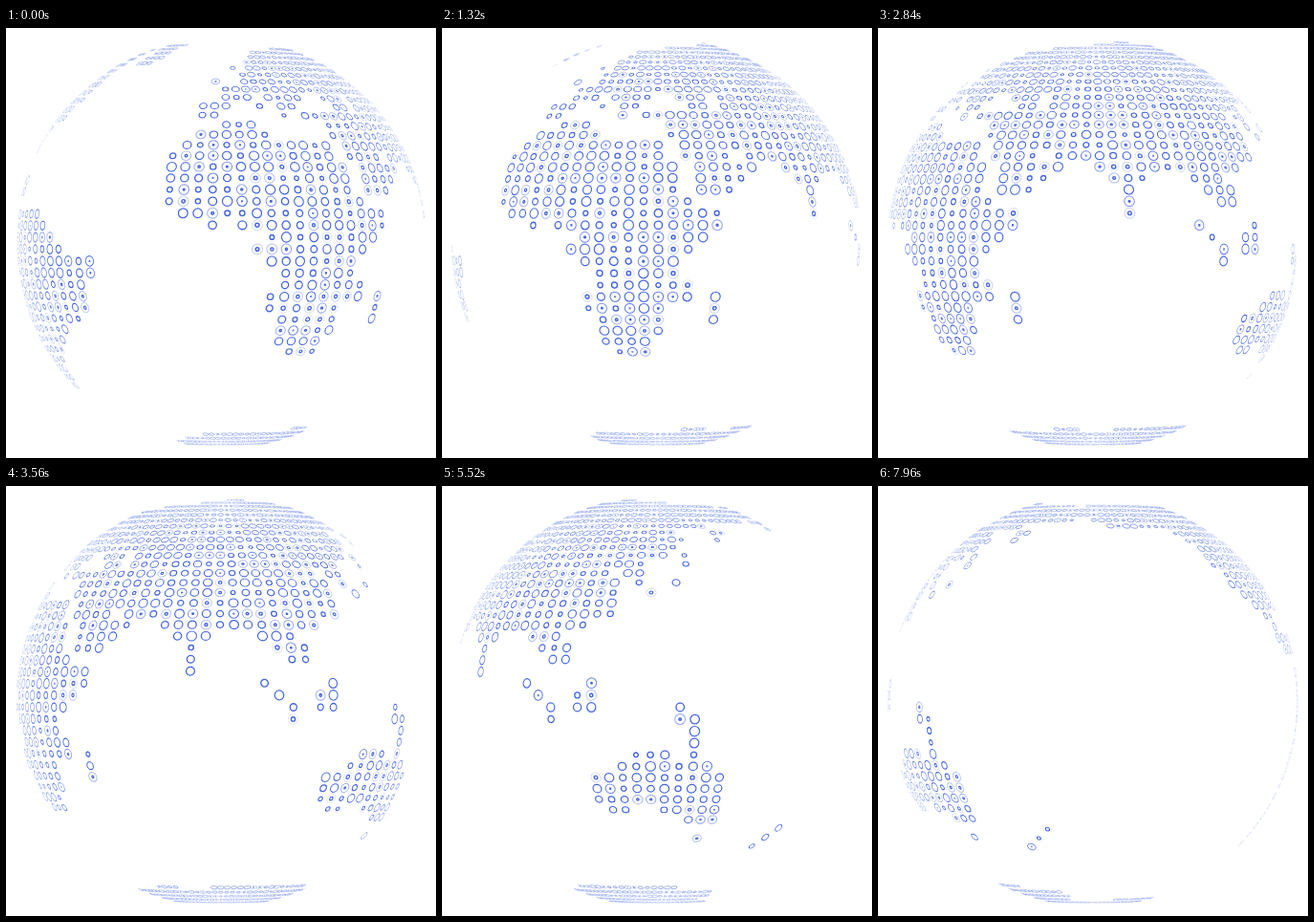
An HTML page with a canvas that plays this animation: 450 by 450 pixels, repeating every 8 s.

```html
<!DOCTYPE html>
<html lang="en">
<head>
<meta charset="utf-8">
<title>Dotted globe</title>
<style>
  html, body { margin: 0; width: 100%; height: 100%; overflow: hidden; background: #fff; }
  canvas { display: block; }
</style>
</head>
<body>
<canvas id="globe" width="450" height="450"></canvas>
<script>
const ctx = document.getElementById('globe').getContext('2d');

const LOOP = 8000;            // ms
const START_LON = -1.7;       // degrees facing the viewer at time 0
const SPIN = 25.28;           // degrees per second
const CENTER = 225.2;
const RADIUS = 215;
const CAMERA = 22;            // camera distance in globe radii
const MIN_DEPTH = 0.1;        // dots closer to the limb are hidden
const COL_STEP = 4;           // degrees of longitude per column
const ROW_STEP = 180 / 56;    // degrees of latitude per row
const RIPPLE = 1600;          // ms between two rings of one dot
const RING_LIFE = 1.3;        // life of a ring, in ripple periods
const RING_SIZE = 5.3;
const RAD = Math.PI / 180;

// Coastlines in grid units: x = column east of Greenwich, y = row from the north pole.
const coasts = {
  africa: `M-.5 16.5H2.5L3.5 18.4H8.4V20.4L9.4 20.6V23.5H10.4V24.5H12.4V26.4L10.4 28.4
    L9.4 28.6V30.5H10.4V32.5H8.4V35.5H7.4V37.4H4.6V36.5H3.6V33.5H2.6V31.5H3.6V29.6L1.6 28.3
    L2.6 26.5H.6V25.6H-.4V26.4H-1.4V25.4H-3.4L-4.4 24.4V19.6L-2.6 17.6L-.5 17.4Z`,
  eurasia: `M-.5 12.5H1.6V10.5H2.6V8.6L4.6 6.6H9.6V5.5H17.6V4.5H23.6V3.6H28.4V4.5H36.4V5.5
    H45.4L47.4 6.6V9.4H40.4V10.5H36.4V11.5H37.4V12.5H36.4V13.5H35.4V14.5H33.4V16.4H31.6V15.6
    H30.4V16.5H31.4V20.5H29.4V21.4H27.4L28.4 22.6V24.4H26.6V23.5H25.6V22.5H24.6V21.5H21.4V22.5
    H20.4V25.4H19.6V22.5H18.6V21.5H17.6V20.5H14.6V19.6H13.4V20.5H15.4V21.4L13.4 23.4H10.6V20.5
    H9.6V18.5H8.6V16.5H6.6V15.6H10.6V14.5H9.6V13.6H7.4V14.5H6.4V15.5H5.4V16.4H4.6V14.5H3.6V13.6
    H2.4V14.4H.4V15.5H-.6V16.4H-2.4V14.5H-.5Z
    M12.6 13.6H13.4V15.4H12.6Z`,
  australia: `M35.6 27.6H36.4V28.6H37.4V32.5H38.4V33.5H39.4V38.4H36.6V37.4H34.6V36.5H32.4V37.4
    H30.6V36.5H29.6V33.5H31.6V32.5H32.6V31.6H35.4V32.4H36.6V29.4H35.6Z`,
  southAmerica: `M-20.4 24.6H-15.8L-12.5 28.4H-9.6V30.4H-10.6V33.4H-11.6V34.5H-13.4
    L-17.4 38.6L-17.6 40.4L-19.6 41.4H-20.4Z`,
  northAmerica: `M48.6 5.6H73.4V13.5L72.4 16.4L69.4 17.5V19L67.4 19.5V21.5L70.4 22V23.4H68
    L65.6 20.4L61.6 15.5V13.5L60.6 12.4L59.6 10.5H51.6V9.5H49.6V8.5H47.6V6.6Z`,
  greenland: `M-15.4 4.6H-8.6V5.5H-9.6V8.5H-10.6V9.4H-13.4V7.4L-15.4 5.5Z`,
  antarctica: `M-11.4 49.6H-7.4V48.6H-3.4V47.6H11.6V46.6H15.4V47.4H20.6V46.6H37.4V47.5H44.4
    V48.5H45.4V49.5H44.4V50.5H54.6V49.6H67.4V51.4H-11.4Z`
};
const islands = [
  [-1, 12], [1, 10], [3, 15], [41, 11], [42, 11], [41, 12], [37, 14], [37, 15],
  [33, 17], [36, 17], [34, 18], [12, 32], [12, 33], [12, 34], [25, 26], [30, 26],
  [26, 27], [29, 27], [30, 27], [27, 28], [29, 28], [30, 28], [27, 29],
  [46, 39], [45, 40], [44, 41], [38, 40]
];

function makeDot(col, row) {
  const lat = (27.5 - row) * ROW_STEP * RAD;
  const noise = Math.sin(col * 127.1 + row * 311.7) * 43758.5453;
  return {
    lon: col * COL_STEP,
    sinLat: Math.sin(lat),
    cosLat: Math.cos(lat),
    phase: noise - Math.floor(noise)
  };
}

const land = new Path2D(Object.values(coasts).join(' '));
const dots = islands.map(([col, row]) => makeDot(col, row));
for (let row = 0; row < 56; row++) {
  for (let col = -22; col <= 75; col++) {
    if (ctx.isPointInPath(land, col, row, 'evenodd')) dots.push(makeDot(col, row));
  }
}

function drawRing(age, opacity) {
  const life = age / RING_LIFE;
  const radius = RING_SIZE * (1 - (1 - life) ** 2.4);
  ctx.globalAlpha = opacity * Math.min(1, (1 - life) * 4);
  ctx.lineWidth = 1.5 - 0.5 * life;
  ctx.beginPath();
  ctx.arc(0, 0, Math.max(radius, 0.4), 0, 2 * Math.PI);
  ctx.stroke();
}

function drawDot(dot, centerLon, time) {
  const angle = (dot.lon - centerLon) * RAD;
  const sin = Math.sin(angle), cos = Math.cos(angle);
  const depth = dot.cosLat * cos;
  if (depth < MIN_DEPTH) return;

  const zoom = CAMERA / (CAMERA - depth);
  const size = zoom * Math.sqrt(dot.cosLat);
  // Lay the rings flat on the sphere.
  ctx.setTransform(
    cos * size, 0,
    -dot.sinLat * sin * size, -dot.cosLat * size,
    CENTER + RADIUS * zoom * dot.cosLat * sin,
    CENTER - RADIUS * zoom * dot.sinLat
  );
  const opacity = Math.min(1, 0.2 + 1.3 * depth);
  const age = (dot.phase + time / RIPPLE) % 1;
  drawRing(age, opacity);
  if (age + 1 < RING_LIFE) drawRing(age + 1, opacity);
}

function render(now) {
  const time = now % LOOP;
  ctx.resetTransform();
  ctx.globalAlpha = 1;
  ctx.fillStyle = '#fff';
  ctx.fillRect(0, 0, 450, 450);
  ctx.strokeStyle = '#4465df';
  const centerLon = START_LON + SPIN * time / 1000;
  for (const dot of dots) drawDot(dot, centerLon, time);
}

const startTime = performance.now();
function tick() {
  render(performance.now() - startTime);
  requestAnimationFrame(tick);
}
tick();
</script>
</body>
</html>
```
